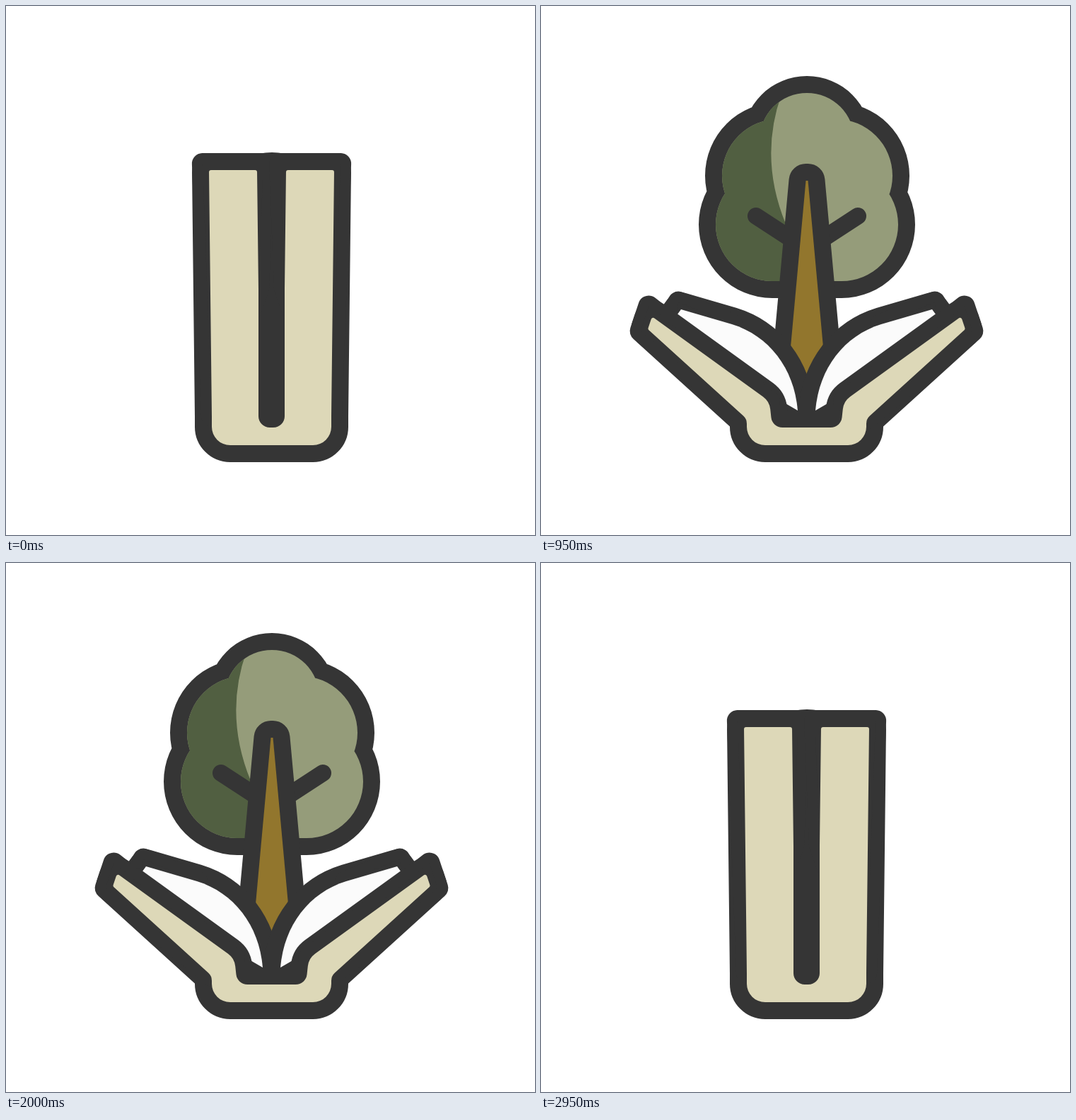
An HTML page with a canvas for the animation above (3000 ms loop, 748 px wide and 748 px high).

```html
<!DOCTYPE html>
<html lang="en">
<head>
<meta charset="utf-8">
<title>Book and tree</title>
<style>
html, body { margin: 0; width: 100%; height: 100%; overflow: hidden; background: #fff; }
canvas { display: block; width: 748px; height: 748px; }
</style>
</head>
<body>
<canvas id="stage" width="748" height="748"></canvas>
<script>
const ctx = document.getElementById('stage').getContext('2d');
const LOOP = 3000, STEP = 50, LINE = 24;
const INK = '#353535', CREAM = '#ddd8b8', PAPER = '#fbfbfb', LEAF = '#959c7a',
      SHADE = '#515f41', WOOD = '#92762d', GLOW = '#f4a72a';

// The motion runs forward, then back along the same path.
const poseTimes = [0, 400, 750, 950, 1150, 1400];
// Left cover: outer tip, inner tip, inner bend, groove x, outer bend y
const coverPoses = [
  [287, 232, 355, 232, 357, 400, 357, 580],
  [259, 263, 316, 258, 350, 545, 351, 580],
  [179, 365, 202, 352, 332, 553, 336, 588],
  [151, 457, 157, 439, 323, 559, 327, 584],
  [136, 500, 139, 478, 318, 560, 320, 579],
  [131, 517, 131, 492, 316, 561, 318, 578]
];
// Left page: lower tip, upper tip, curve start, two controls, curve end, lower bend
const pagePoses = [
  [340, 300, 345, 300, 348, 345, 351, 400, 354, 450, 360, 572, 350, 550],
  [318, 310, 326, 300, 333, 345, 342, 400, 350, 450, 360, 572, 345, 550],
  [228, 380, 232, 371, 262, 400, 325, 440, 355, 510, 362, 567, 340, 560],
  [190, 440, 198, 429, 270, 450, 322, 466, 358, 512, 363, 572, 325, 550],
  [167, 478, 172, 453, 262, 463, 320, 470, 360, 512, 363, 571, 318, 558],
  [158, 488, 163, 464, 258, 464, 318, 464, 359, 512, 363, 572, 318, 560]
];
const treeTimes = [0, 400, 550, 750, 950, 1080, 1150, 1400];
const treeShift = [[108], [98], [74], [38], [0], [-20], [-15], [7]];
const rayTimes = [1090, 1150, 1350], rayGrowth = [[0], [0.21], [1]];

// Monotone cubic through rows of values
function sample(times, rows, t) {
  const last = times.length - 1;
  if (t <= times[0]) return rows[0];
  if (t >= times[last]) return rows[last];
  let i = 0;
  while (t >= times[i + 1]) i++;
  const h = times[i + 1] - times[i], k = (t - times[i]) / h;
  const k2 = k * k, k3 = k2 * k;
  return rows[i].map((a, j) => {
    const slope = n => (rows[n + 1][j] - rows[n][j]) / (times[n + 1] - times[n]);
    const tangent = n => {
      if (n === 0 || n === last) return 0;
      const p = slope(n - 1), q = slope(n);
      return p * q <= 0 ? 0 : 2 * p * q / (p + q);
    };
    return a * (2 * k3 - 3 * k2 + 1) + rows[i + 1][j] * (3 * k2 - 2 * k3)
      + h * (tangent(i) * (k3 - 2 * k2 + k) + tangent(i + 1) * (k3 - k2));
  });
}

const flip = ([x, ...rest]) => [751 - x, ...rest];
const middle = (a, b) => [(a[0] + b[0]) / 2, (a[1] + b[1]) / 2];

function toPairs(row) {
  const list = [];
  for (let i = 0; i < row.length; i += 2) list.push([row[i], row[i + 1]]);
  return list;
}

function unit(a, b) {
  const d = Math.hypot(b[0] - a[0], b[1] - a[1]) || 1;
  return [(b[0] - a[0]) / d, (b[1] - a[1]) / d];
}

// Corner pushed outward so both of its edges move by dist
function pushCorner(prev, p, next, dist) {
  const u = unit(p, prev), v = unit(p, next);
  const sin = Math.max(0.3, Math.abs(u[0] * v[1] - u[1] * v[0]));
  return [p[0] - (u[0] + v[0]) * dist / sin, p[1] - (u[1] + v[1]) * dist / sin];
}

function polygon(points) {
  const p = new Path2D();
  points.forEach(([x, y]) => p.lineTo(x, y));
  p.closePath();
  return p;
}

function ink(path, radius) {
  ctx.strokeStyle = ctx.fillStyle = INK;
  ctx.lineWidth = radius * 2;
  ctx.stroke(path);
  ctx.fill(path);
}

function paint(path, color) {
  ctx.fillStyle = color;
  ctx.fill(path);
}

function segment(x1, y1, x2, y2, width, color) {
  ctx.strokeStyle = color;
  ctx.lineWidth = width;
  ctx.beginPath();
  ctx.moveTo(x1, y1);
  ctx.lineTo(x2, y2);
  ctx.stroke();
}

function crown(grow) {
  const p = new Path2D();
  const lobes = [[376, 190, 67], [336, 240, 80], [417, 240, 80], [327, 309, 80], [425, 309, 80]];
  lobes.forEach(([x, y, r]) => {
    p.moveTo(x + r + grow, y);
    p.arc(x, y, r + grow, 0, Math.PI * 2);
  });
  p.rect(327, 200, 98, 189 + grow);
  return p;
}
const crownInk = crown(LINE), crownFill = crown(0);
const shadeSide = new Path2D('M341 100L340 125Q308 215 346 308L350 420H200V100Z');

function drawTree(shift, cover) {
  const [outer, inner, bend, [, bendY]] = cover;
  const base = middle(bend, [291, bendY]);
  const dir = unit(base, middle(outer, inner));
  const far = [base[0] + dir[0] * 1000, base[1] + dir[1] * 1000];
  const left = [[far[0], -900], far, base];
  ctx.save();
  ctx.clip(polygon([...left, ...left.map(flip).reverse()]));
  ctx.translate(0, shift);

  paint(crownInk, INK);
  paint(crownFill, LEAF);
  ctx.save();
  ctx.clip(crownFill);
  paint(shadeSide, SHADE);
  ctx.restore();

  segment(304, 297, 350, 327, 24, INK);
  segment(448, 297, 402, 327, 24, INK);
  const foot = 560 - shift, half = 1.5 + (foot - 247) * 0.0915;
  const trunk = polygon([[374.5, 247], [377.5, 247], [376 + half, foot], [376 - half, foot]]);
  ink(trunk, LINE);
  paint(trunk, WOOD);
  ctx.restore();
}

function drawPage(points) {
  const [low, tip, start, c1, c2, end, bend] = points;
  const p = new Path2D();
  p.moveTo(...low);
  p.lineTo(...tip);
  p.lineTo(...start);
  p.bezierCurveTo(...c1, ...c2, ...end);
  p.lineTo(...bend);
  p.closePath();
  ink(p, LINE);
  ink(polygon([low, pushCorner(low, tip, start, 9), start]), 15);
  paint(p, PAPER);
}

function drawCover([outer, inner, bend, [groove, bendY]]) {
  const heel = [291, bendY];
  const left = [
    [groove, 596, 16], [...bend, 25], [...inner, 3],
    [...outer, 3], [...heel, 15], [291, 621, 26]
  ];
  const ring = [...left, ...left.map(flip).reverse()];
  const p = new Path2D();
  p.moveTo(375.5, 596);
  ring.forEach(([x, y, r], i) => {
    const next = ring[i + 1] || [375.5, 596];
    p.arcTo(x, y, next[0], next[1], r);
  });
  p.closePath();
  ink(p, LINE);

  const flap = [
    pushCorner(inner, outer, heel, 9),
    pushCorner(outer, inner, bend, 9),
    bend, heel
  ];
  ink(polygon(flap), 15);
  ink(polygon(flap.map(flip)), 15);
  paint(p, CREAM);
}

function drawRays(u) {
  if (u < 1090) return;
  const [k] = sample(rayTimes, rayGrowth, u);
  const rays = [[146, 218, 21, 21], [120, 282.5, 28.5, 0], [146, 346, 21, -21]];
  rays.forEach(([x, y, dx, dy]) => {
    const ex = x + dx * k + 0.01, ey = y + dy * k;
    segment(x, y, ex, ey, 25, GLOW);
    segment(751.5 - x, y, 751.5 - ex, ey, 25, GLOW);
  });
}

function draw(time) {
  const t = Math.floor((time % LOOP) / STEP) * STEP;
  const u = Math.min(t, LOOP - STEP - t);
  const cover = toPairs(sample(poseTimes, coverPoses, u));
  const page = toPairs(sample(poseTimes, pagePoses, u));

  ctx.fillStyle = '#fff';
  ctx.fillRect(0, 0, 748, 748);
  ctx.lineJoin = ctx.lineCap = 'round';
  drawTree(sample(treeTimes, treeShift, u)[0], cover);
  drawPage(page);
  drawPage(page.map(flip));
  drawCover(cover);
  drawRays(u);
}

const begin = performance.now();
function tick() {
  draw(performance.now() - begin);
  requestAnimationFrame(tick);
}
tick();
</script>
</body>
</html>
```
